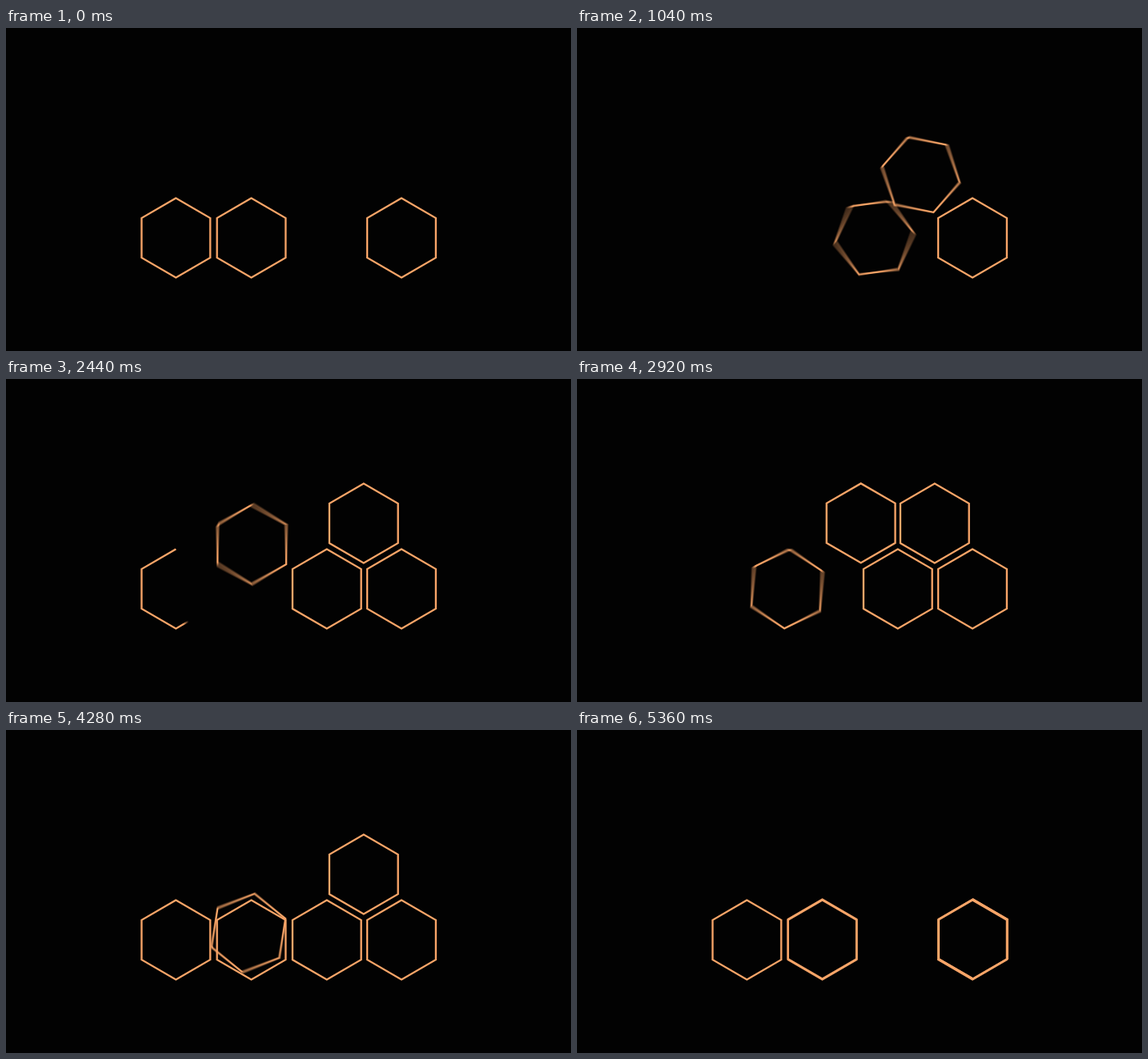
Recreate the animation shown at these times as an HTML page with a canvas. Size 690 by 394 pixels, loop 5640 ms.

```html
<!DOCTYPE html>
<html lang="en">
<head>
<meta charset="utf-8">
<title>Rolling hexagons</title>
<style>
  html, body { margin: 0; width: 100%; height: 100%; overflow: hidden; background: #020202; }
  canvas { display: block; width: 690px; height: 394px; }
</style>
</head>
<body>
<canvas id="stage" width="690" height="394"></canvas>
<script>
const W = 690, H = 394;
const LOOP = 5640, STEP = 40;
const SHUTTER = 12, SAMPLES = 12;
const R = 48.4, COLOR = '#f8a568', LINE = 2.3, BACK = '#020202';

const FLOOR = 256;
const A = 207.5, B = 299.6, C = 391.8, D = 483;
const LEFT = [346, 229], RIGHT = [437.4, 229];

const view = document.getElementById('stage').getContext('2d');
const layer = document.createElement('canvas');
layer.width = W;
layer.height = H;
const ctx = layer.getContext('2d');

const slide = (from, to, dx, turn) => ({ from, to, dx, turn });
const roll = (from, to, pivot, turn) => ({ from, to, pivot, turn });

const pieces = [
  { x: D, y: FLOOR, moves: [] },
  { x: B, y: FLOOR, moves: [
    slide(0, 680, C - B, 120),
    roll(680, 1160, RIGHT, 120),
    roll(4350, 4830, RIGHT, -120),
    roll(4830, 5310, RIGHT, -120)
  ] },
  { x: A, y: FLOOR, moves: [
    slide(680, 1160, C - A, 240),
    roll(4830, 5310, RIGHT, -120)
  ] },
  { x: A - 1, y: FLOOR - 1, draw: [1160, 1670], moves: [
    slide(1670, 2150, B - A + 1, 120),
    roll(2200, 2680, LEFT, 120),
    roll(3880, 4360, LEFT, -120)
  ] },
  { x: A, y: FLOOR, draw: [2160, 2670], moves: [slide(2670, 3150, B - A, 120)] },
  { x: A, y: FLOOR, draw: [3160, 3680], moves: [] }
];

const progress = (t, from, to) => Math.min(1, Math.max(0, (t - from) / (to - from)));
const ease = u => u * u * (3 - 2 * u);

function poseAt(piece, t) {
  let { x, y } = piece, angle = 0;
  for (const m of piece.moves) {
    const p = ease(progress(t, m.from, m.to));
    const turn = p * m.turn * Math.PI / 180;
    if (m.pivot) {
      const [px, py] = m.pivot;
      const dx = x - px, dy = y - py;
      const c = Math.cos(turn), s = Math.sin(turn);
      x = px + dx * c - dy * s;
      y = py + dx * s + dy * c;
    } else {
      x += p * m.dx;
    }
    angle += turn;
  }
  return { x, y, angle };
}

// Outline runs anticlockwise from the top corner; part is 0 to 1.
function hexagon({ x, y, angle }, part) {
  if (part <= 0) return;
  const corner = i => {
    const a = angle - Math.PI / 2 - i * Math.PI / 3;
    return [x + R * Math.cos(a), y + R * Math.sin(a)];
  };
  const sides = part * 6, whole = Math.floor(sides), rest = sides - whole;
  ctx.beginPath();
  ctx.moveTo(...corner(0));
  for (let i = 1; i <= Math.min(whole, 5); i++) ctx.lineTo(...corner(i));
  if (part >= 1) {
    ctx.closePath();
  } else {
    const [ax, ay] = corner(whole), [bx, by] = corner(whole + 1);
    ctx.lineTo(ax + (bx - ax) * rest, ay + (by - ay) * rest);
  }
  ctx.stroke();
}

function scene(t) {
  ctx.fillStyle = BACK;
  ctx.fillRect(0, 0, W, H);
  ctx.strokeStyle = COLOR;
  ctx.lineWidth = LINE;
  for (const piece of pieces) {
    hexagon(poseAt(piece, t), piece.draw ? progress(t, ...piece.draw) : 1);
  }
}

// Motion blur: running average of the scene while the shutter is open.
function render(t) {
  for (let i = 0; i < SAMPLES; i++) {
    scene(t + SHUTTER * (i / (SAMPLES - 1) - 0.5));
    view.globalAlpha = 1 / (i + 1);
    view.drawImage(layer, 0, 0);
  }
}

const start = performance.now();
let shown = -1;

function tick() {
  const now = Math.max(0, performance.now() - start) % LOOP;
  const t = Math.floor(now / STEP) * STEP;
  if (t !== shown) {
    render(t);
    shown = t;
  }
  requestAnimationFrame(tick);
}
tick();
</script>
</body>
</html>
```
